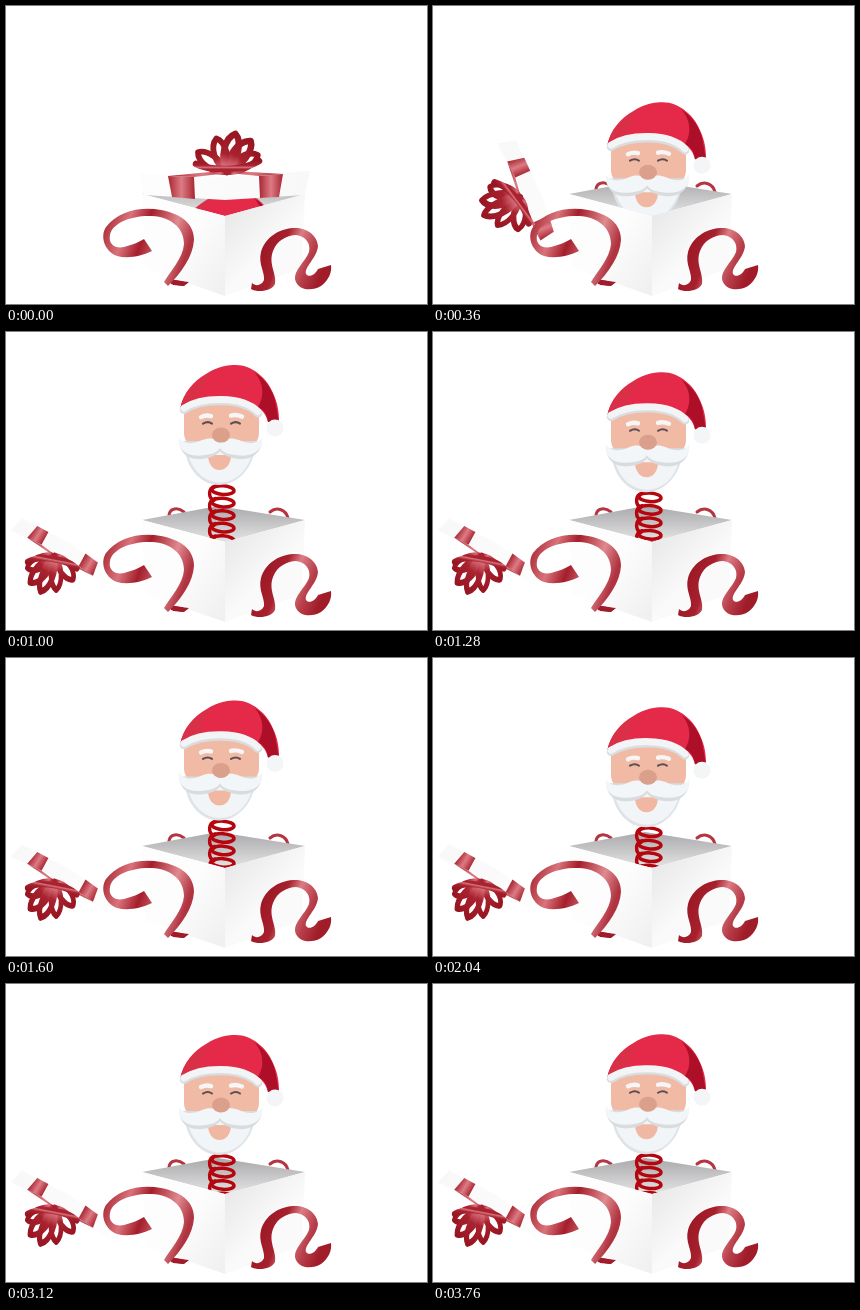
Recreate the animation shown at these times as an HTML page without scripts. Size 421 by 298 pixels, loop 3800 ms.

```html
<!DOCTYPE html>
<html lang="en">
<head>
<meta charset="utf-8">
<title>Santa in a gift box</title>
<style>
  @property --tick { syntax: "<number>"; inherits: true; initial-value: 0; }

  html, body { margin: 0; width: 100%; height: 100%; overflow: hidden; background: #fff; }
  svg { display: block; width: 421px; height: 298px; animation: run 3.8s steps(95) infinite; }
  @keyframes run { from { --tick: 0; } to { --tick: 95; } }

  /* Santa rises for 15 ticks, then rings out like a damped spring. */
  .santa {
    --left: calc(1 - min(var(--tick) / 15, 1));
    --after: max(0, var(--tick) - 15);
    --rise: calc(136 * pow(var(--left), 1.16));
    --bounce: calc(22.7 * exp(var(--after) / -29) * sin(var(--after) * 45deg));
    transform: translateY(calc((14.2 + var(--rise) - var(--bounce)) * 1px));
  }

  /* The lid tumbles off to the left in 12 ticks, its bow fanning out. */
  .lid {
    --p: min(var(--tick) / 12, 1);
    --hop: calc(25 * sin(var(--p) * 180deg));
    transform-origin: 221px 180px;
    transform: translate(calc(var(--p) * -164px), calc((var(--p) * 38 - var(--hop)) * 1px))
               rotate(calc(var(--p) * -149deg)) scale(calc(1 - .34 * var(--p)));
  }
  .bow {
    transform-origin: 221px 167px;
    transform: translateX(calc(var(--p) * 7px)) rotate(calc(var(--p) * -20deg))
               scale(calc(1 + .2 * var(--p)), calc(1 + .5 * var(--p)));
  }

  .line { fill: none; stroke-linecap: round; stroke-linejoin: round; }
</style>
</head>
<body>
<svg viewBox="0 0 421 298" role="img" aria-label="Santa springs out of a gift box">
  <defs>
    <linearGradient id="satin" x2="1" y2=".3">
      <stop offset="0" stop-color="#a01a27"/>
      <stop offset=".3" stop-color="#d9737b"/>
      <stop offset=".5" stop-color="#a41e2b"/>
      <stop offset=".8" stop-color="#e08a90"/>
      <stop offset="1" stop-color="#b03340"/>
    </linearGradient>
    <linearGradient id="curl" x2="1" y2=".3">
      <stop offset=".2" stop-color="#9c1824"/>
      <stop offset=".45" stop-color="#a6212d"/>
      <stop offset=".6" stop-color="#dc7c84"/>
      <stop offset=".8" stop-color="#b8404b"/>
      <stop offset="1" stop-color="#a01c29"/>
    </linearGradient>
    <linearGradient id="loop" y2="1" x2="0">
      <stop offset="0" stop-color="#981622"/>
      <stop offset=".55" stop-color="#a8222f"/>
      <stop offset=".85" stop-color="#d7707a"/>
      <stop offset="1" stop-color="#a8222f"/>
    </linearGradient>
    <linearGradient id="band">
      <stop offset="0" stop-color="#a82632"/>
      <stop offset=".5" stop-color="#dd7b84"/>
      <stop offset="1" stop-color="#a82632"/>
    </linearGradient>
    <linearGradient id="inside" x2="0" y2="1">
      <stop offset="0" stop-color="#a9a9ab"/>
      <stop offset="1" stop-color="#e4e4e5"/>
    </linearGradient>
    <linearGradient id="leftSide" x2="1" y2=".9">
      <stop offset=".5" stop-color="#fdfdfd"/>
      <stop offset="1" stop-color="#f0f0f0"/>
    </linearGradient>
    <linearGradient id="rightSide" x2=".8" y2="1">
      <stop offset="0" stop-color="#e4e4e4"/>
      <stop offset=".6" stop-color="#fafafa"/>
    </linearGradient>
    <linearGradient id="lidSide">
      <stop offset="0" stop-color="#fdfdfd"/>
      <stop offset="1" stop-color="#f8f8f8"/>
    </linearGradient>
    <clipPath id="opening">
      <path d="M0 0H421V188H299L219 210 136 188H0Z"/>
    </clipPath>
    <g id="coil">
      <ellipse cx="217" cy="160" rx="11" ry="4.300" transform="rotate(4 217 160)"/>
      <path d="M209 156C202 158 202 168 208 170"/>
    </g>
    <path id="petal" d="M221 166C211 153 212 133 222 127C230 133 230 153 221 166"/>
  </defs>

  <!-- back ribbons and box interior -->
  <g class="line" stroke="#b53543" stroke-width="3">
    <path d="M163 183C164 176 172 175 178 180"/>
    <path d="M264 180C271 174 280 178 282 186"/>
  </g>
  <path d="M136 188L212 174 299 188 219 210Z" fill="url(#inside)"/>

  <g clip-path="url(#opening)">
    <g class="santa">
      <g class="line" stroke="#b5060f" stroke-width="3.5">
        <use href="#coil"/>
        <use href="#coil" y="12.5"/>
        <use href="#coil" y="25"/>
        <use href="#coil" y="37.5"/>
        <use href="#coil" y="50"/>
        <use href="#coil" y="62.5"/>
      </g>
      <path d="M178 112C179 140 196 155 213 155S248 140 250 112Z" fill="#dfe3e6"/>
      <path d="M180 112C182 138 197 152.500 214 152.500S246 138 248 112Z" fill="#f2f5f7"/>
      <rect x="178" y="70" width="75" height="48" rx="15" fill="#f1baa4"/>
      <path d="M202 125H225C225 134 220 140 213.500 140S202 134 202 125Z" fill="#f0b8a3"/>
      <path d="M173 111C174 126 186 130 196 129C205 128 211 125 214 121C217 125 224 128 233 129C245 130 255 124 256 111Z" fill="#d8dcdf"/>
      <path d="M173 107C178 115 188 114 196 110C203 107 210 108 214 113C218 108 225 107 233 110C241 114 251 115 256 107C258 121 246 126 235 125.500C224 125 217 123 214 118C211 123 204 125 194 125.500C182 126 171 121 173 107Z" fill="#f3f6f8"/>
      <ellipse cx="215" cy="105" rx="9" ry="7.500" fill="#dba08c"/>
      <g class="line" stroke="#5d4d55" stroke-width="2">
        <path d="M197 93.500Q202 90.500 206 93.500M225 93.500Q230 90.500 234 93.500"/>
      </g>
      <g class="line" stroke="#f6f6f7" stroke-width="4.400">
        <path d="M195 87Q200 84.500 205 86M225 85.500Q230 84 236 86.500"/>
      </g>
      <path d="M174 80C177 62 188 51 200 44C212 36 222 35 230 35C246 35 261 48 267 63C272 74 273 82 273 92H262C260 84 256 80 252 78C225 66 195 68 174 80Z" fill="#e42a48"/>
      <path d="M174 80C177 62 188 51 212 39C200 46 196 56 194 70Z" fill="#d93048"/>
      <path d="M248 42C261 50 267 62 269 70L273 92H262C261 84 257 79 252 77C260 64 256 50 248 42Z" fill="#ad0f29"/>
      <g class="line">
        <path d="M178 79.500C196 68 236 67 252 83" stroke="#d9dde0" stroke-width="8.600"/>
        <path d="M178 78C196 66.500 236 65.500 252 81.500" stroke="#f2f4f6" stroke-width="7"/>
      </g>
      <circle cx="269" cy="98" r="8.500" fill="#f3f5f6"/>
    </g>
  </g>

  <!-- box front -->
  <path d="M163 273L183 276 177 280 165 278Z" fill="#a01c2b"/>
  <path d="M136 188L219 210V290L139 262Z" fill="url(#leftSide)"/>
  <path d="M219 210L299 188 296 262 219 290Z" fill="url(#rightSide)"/>
  <path d="M164 274L183 276 178 280 167 279Z" fill="#a01c2b"/>

  <g class="lid">
    <path d="M134 168L219 162 304 165 299 189 219 194 138 189Z" fill="url(#lidSide)"/>
    <path d="M134 168L219 162 304 165 219 171Z" fill="#fff"/>
    <g fill="url(#band)">
      <path d="M162 170L188 171 189 193 166 191Z"/>
      <path d="M253 170L277 168 273 191 254 192Z"/>
      <path d="M162 170L188 171 231 166 214 165Z"/>
      <path d="M277 168L253 170 212 166 228 165Z"/>
    </g>
    <g class="bow line" stroke="url(#loop)" stroke-width="6.500">
      <use href="#petal" transform="rotate(-57 221 166) translate(22 16.600) scale(.9)"/>
      <use href="#petal" transform="rotate(60 221 166) translate(22 16.600) scale(.9)"/>
      <use href="#petal" transform="rotate(36 221 166)"/>
      <use href="#petal" transform="rotate(-19 221 166) translate(22 16.600) scale(.9)"/>
      <use href="#petal" transform="rotate(11 221 166)"/>
      <path d="M190 158C204 165 238 165 253 155"/>
    </g>
  </g>

  <!-- front ribbons -->
  <path d="M146 245C136 250 122 253 111 250C98 245 94 230 100 221C112 205 135 200 155 204C176 208 188 218 188 234C187 250 176 266 162 280L158 276C164 266 177 252 178 238C178 222 165 211 146 210C126 209 106 217 104 229C102 239 110 243 118 241C126 239 133 236 138 233Z" fill="url(#satin)"/>
  <path d="M245 283C252 287 266 285 269 278C271 268 262 258 267 245C271 234 282 229 290 229C300 230 305 238 303 246C299 256 288 264 289 273C291 284 305 286 315 280C323 274 326 266 325 259L312 263C309 269 303 272 300 268C298 261 311 252 312 240C311 228 299 221 287 222C272 223 259 232 255 246C252 258 259 266 258 274C256 279 250 281 246 277Z" fill="url(#curl)"/>
</svg>
</body>
</html>
```
